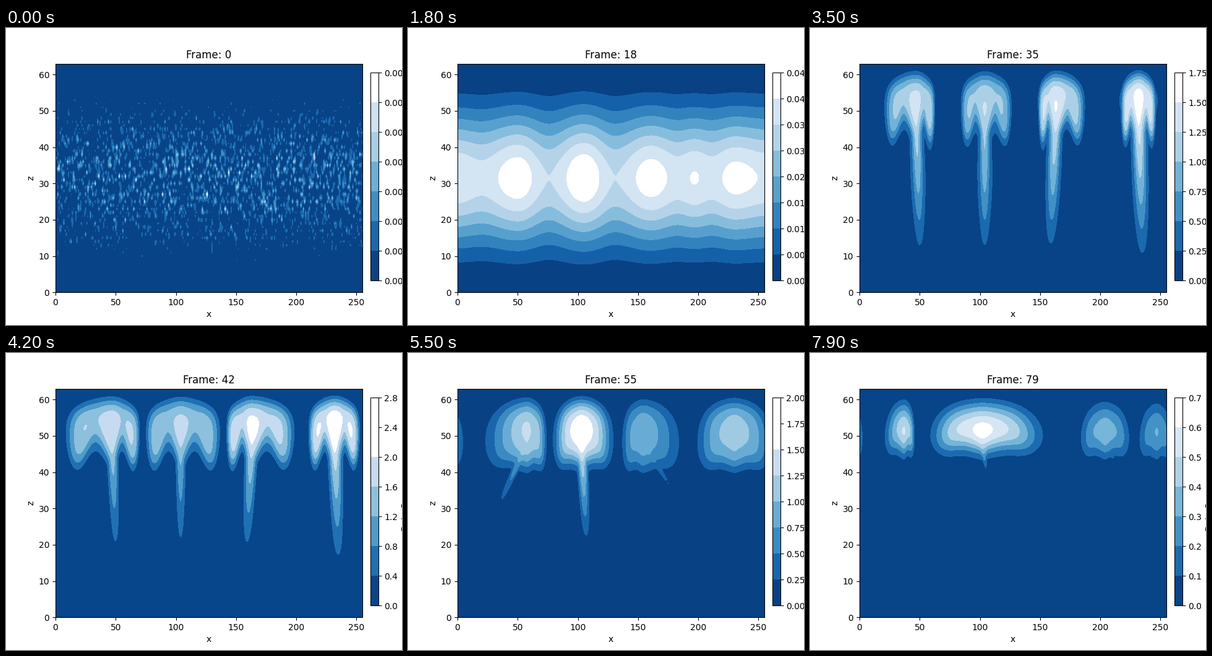
Write a matplotlib script that moves like this. It is 640 px wide and 480 px high and loops after 8000 ms.

```python
import numpy as np
import matplotlib.pyplot as plt
from matplotlib.animation import FuncAnimation
from matplotlib.colors import ListedColormap

NX, NZ, FRAMES = 256, 64, 80
X, Z = np.meshgrid(np.arange(NX), np.arange(NZ))


def smooth(t):
    t = np.clip(t, 0, 1)
    return t * t * (3 - 2 * t)


def wave(v, points):
    """Cosine interpolation between turning points."""
    xs, ys = np.array(points, float).T
    i = np.clip(np.searchsorted(xs, v, "right") - 1, 0, len(xs) - 2)
    t = (v - xs[i]) / (xs[i + 1] - xs[i])
    return ys[i] + (ys[i + 1] - ys[i]) * (1 - np.cos(np.pi * t)) / 2


def around(x0):
    """Signed distance to x0 on the periodic axis."""
    return (X - x0 + NX / 2) % NX - NX / 2


def depth(row):
    """Chebyshev grid height (0..1) of a row index."""
    return (1 - np.cos(np.pi * np.clip((row + 0.5) / NZ, 0, 1))) / 2


# Initial noise, damped at the walls
height = depth(Z)
noise = np.random.default_rng(42).standard_normal((NX, NZ)).T
noise *= height * (1 - height)
noise *= 0.00104 / noise.max()
noise_hat = np.fft.fft2(noise)
KX, KZ = np.meshgrid(np.fft.fftfreq(NX), np.fft.fftfreq(NZ))


def blurred_noise(n):
    sx, sz = 2.2 * n, 0.9 * n
    damp = np.exp(-2 * np.pi**2 * ((KX * sx) ** 2 + (KZ * sz) ** 2))
    return np.fft.ifft2(noise_hat * damp).real


# Crests and troughs of the growing columns
RATE, MEAN = 0.34, 0.05
RIPPLE = wave(X, [(0, .056), (20, -.005), (50, .158), (76, -.06),
                  (105, .187), (131, -.06), (161, .142), (183, .0255),
                  (197, .075), (211, .024), (231, .122), (256, .056)]) - MEAN
SAG = 4 * np.exp(-(around(0) / 14) ** 2)


def columns(n):
    mean = np.interp(n, [0, 9, 18, 27], [0, .0217, .0412, MEAN])
    amp = mean + RIPPLE * np.exp(RATE * min(n - 27, 5)) * min(n, 1)
    sag = SAG * np.clip((n - 18) / 9, 0, 1)
    return np.maximum(amp * np.sin(np.pi * depth(Z + sag)) + blurred_noise(n), 0)


# Key poses of each plume: left, right, crest x, peak, stalk tip x, tip z
TIMES = [42, 55, 79]
PLUMES = [
    [(8, 70, 47, 1.93, 50, 20), (22, 74, 58, 1.32, 36, 32), (20, 46, 37, .52, 41, 45)],
    [(75, 137, 104, 1.75, 104, 21), (79, 130, 103, 1.79, 107, 22), (57, 155, 102, .66, 105, 41)],
    [(142, 199, 163, 2.15, 159, 20), (137, 185, 154, .96, 177, 36), (183, 225, 204, .38, 212, 43)],
    [(210, 253, 232, 2.41, 235, 16.5), (199, 261, 230, 1.2, 230, 41), (232, 259, 247, .31, 243, 44)],
]


def plume(n, poses):
    def at(*values):
        return np.interp(n, TIMES, values)

    left, right, crest, peak, tip_x, tip_z = (at(*col) for col in zip(*poses))
    edge = at(.4, .25, .1)
    young = 1 - np.clip((n - 30) / 12, 0, 1)
    tip_z -= 8 * young
    dx = around(crest)
    reach = np.where(dx < 0, crest - left, right - crest)
    other = right - left - reach
    u = np.abs(dx) / reach / (1 - 0.55 * young)

    # Domed cap with a steeper short side
    room = np.maximum(NZ - 1 - 4 * np.minimum(u, 1.5) ** 2 - Z, 0)
    top = 1 - np.exp(-(room / at(4.6, 5.5, 7)) ** 2)
    side = (edge / peak) ** (u ** (at(9, 3.5, 3.5) * np.sqrt(other / reach)))

    # Underside: an arch on each side of the stalk, lobes at the rim
    arch = (1 + np.cos(np.pi * (np.minimum(u, 1) - 0.35) / 0.42)) / 2
    rise = at(5.5, 1, 1)
    soft = 1.7 + 0.12 * rise * arch
    base = at(40, 39.5, 43.5) + rise * arch + soft * np.log(peak / edge - 1)
    cap = side * top / (1 + np.exp((base - Z) / soft))
    cap *= peak / cap.max()

    # Stalk tapering down to its tip
    up = Z - tip_z
    axis = np.clip(edge + up * (peak - edge) / (51 - tip_z), 0, peak)
    lean = (tip_x - crest) * (1 - np.clip(up / (48 - tip_z), 0, 1))
    width = 2 * peak + 0.2 + 0.4 * reach * smooth((Z - 43) / 12)
    stalk = axis * top * np.exp(-((dx - lean) / width) ** 2)

    both = (cap**6 + stalk**6) ** (1 / 6)
    return both * peak / both.max()


def field(n):
    w = smooth((n - 30) / 8)
    total = np.zeros((NZ, NX))
    if w < 1:
        total += (1 - w) * columns(n)
    if w > 0:
        total += w * sum(plume(n, poses) for poses in PLUMES)
    return total


# Blues, with the palest shades washed out to white
shades = plt.get_cmap("Blues_r")(np.linspace(0, 1, 256))
shades[int(0.91 * 256):] = 1
BLUES = ListedColormap(shades)

fig, ax = plt.subplots(figsize=(6.4, 4.8), dpi=100)
bar = {"ax": None}


def draw(n):
    data = field(n)
    ax.clear()
    if bar["ax"] is not None:
        bar["ax"].remove()
    bar["ax"] = fig.add_axes([0.92, 0.15, 0.02, 0.7])
    filled = ax.contourf(data, cmap=BLUES, vmin=data.min(), vmax=data.max())
    fig.colorbar(filled, cax=bar["ax"], label="Data Pressure")
    ax.set_title(f"Frame: {n}")
    ax.set_xlabel("x")
    ax.set_ylabel("z")
    return []


anim = FuncAnimation(fig, draw, frames=FRAMES, init_func=lambda: [],
                     interval=100, repeat=True, repeat_delay=0)
plt.show()
```
